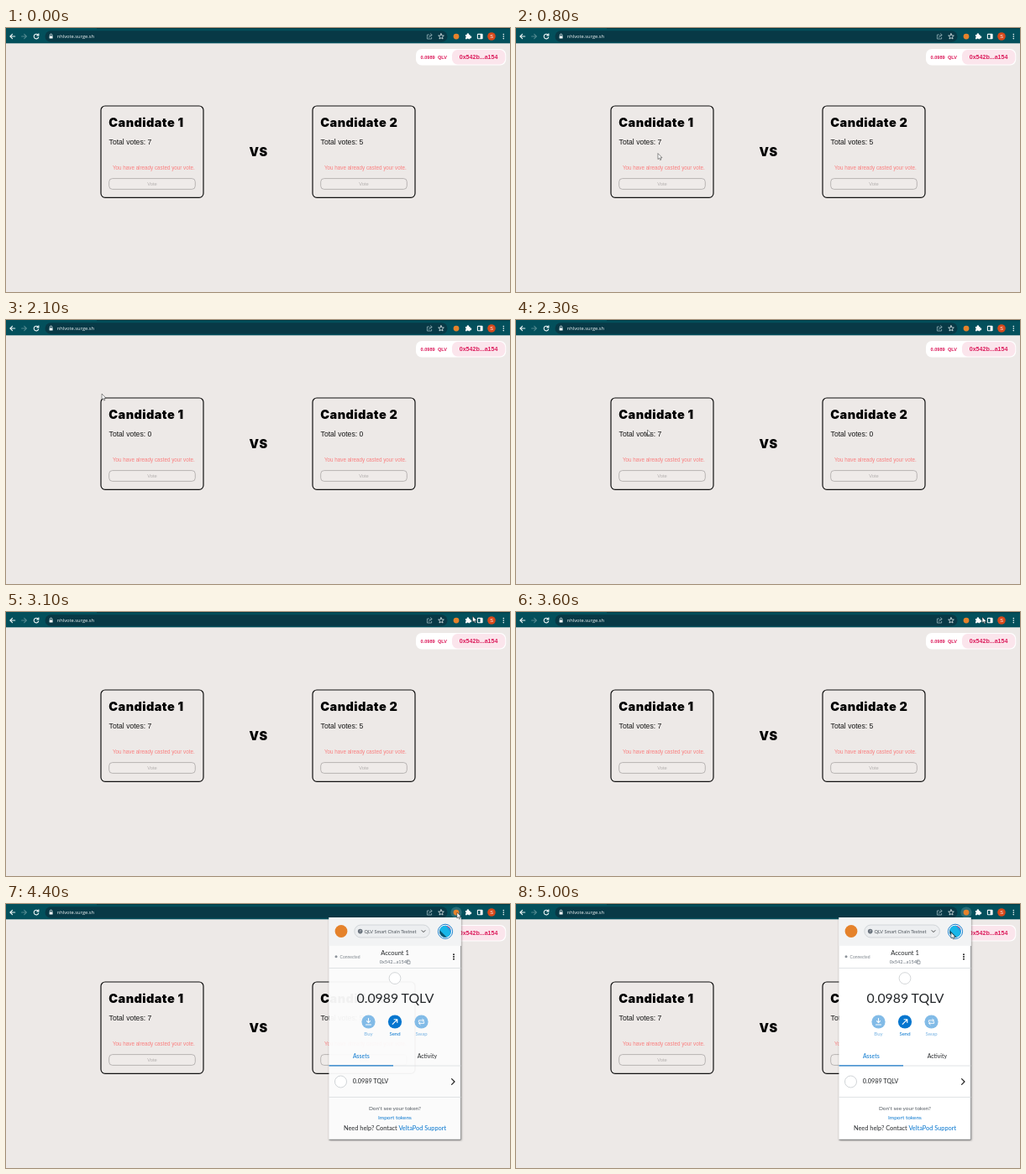
Write an HTML page that moves like this. It is 600 by 315 pixels and loops after 5.1 s.

```html
<!DOCTYPE html>
<html lang="en">
<head>
<meta charset="utf-8">
<title>Vote</title>
<style>
html, body { margin: 0; width: 100%; height: 100%; overflow: hidden; background: #ede9e7; }
svg { display: block; width: 600px; height: 315px; }
text { font-family: "Liberation Sans", Arial, sans-serif; }
.black { font: 900 14.5px Inter, sans-serif; letter-spacing: .42px; }
.lato, .lato text { font-family: Lato, sans-serif; }
.mid { text-anchor: middle; }
.line { fill: none; stroke-linecap: round; stroke-linejoin: round; }
</style>
</head>
<body>
<svg viewBox="0 0 600 315">
  <defs>
    <g id="card">
      <rect x="113" y="93" width="122" height="109.3" rx="5" fill="none" stroke="#111" stroke-width="1.2"/>
      <text x="127" y="168.6" font-size="6.28" fill="#fa7f7f">You have already casted your vote.</text>
      <rect x="122.7" y="179.6" width="102.6" height="12.8" rx="4" fill="#efebe9" stroke="#aaa6a5" stroke-width=".8"/>
      <text class="mid" x="174" y="188" font-size="5.8" fill="#b4b0af">Vote</text>
    </g>
    <filter id="shade" x="-10%" y="-10%" width="120%" height="120%">
      <feDropShadow dx=".6" dy="1" stdDeviation="1.2" flood-opacity=".5"/>
    </filter>
    <clipPath id="face"><circle cx="523" cy="32.8" r="7"/></clipPath>
  </defs>

  <rect width="600" height="315" fill="#ede9e7"/>

  <!-- voting page -->
  <use href="#card"/>
  <use href="#card" x="252"/>
  <text class="black" x="122.3" y="118">Candidate 1</text>
  <text class="black" x="374.3" y="118">Candidate 2</text>
  <text id="votes1" x="122.6" y="139" font-size="8.6" fill="#151515"></text>
  <text id="votes2" x="374.6" y="139" font-size="8.6" fill="#151515"></text>
  <text class="black" x="289.5" y="153.2">VS</text>

  <rect x="488" y="25" width="107.3" height="19.5" rx="7" fill="#fff"/>
  <rect x="531" y="26" width="63.3" height="17.5" rx="6.5" fill="#fbe5ec"/>
  <g font-weight="700" fill="#dc1c5c">
    <text x="493.6" y="37" font-size="5.6">0.0989</text>
    <text x="514" y="37" font-size="5.6">QLV</text>
    <text x="539.7" y="37.2" font-size="7.1">0x542b...a154</text>
  </g>

  <!-- browser bar -->
  <rect width="600" height="18.3" fill="#03505c"/>
  <rect x="108" width="492" height="1.2" fill="#023c46"/>
  <rect x="46.5" y="3.2" width="479" height="13.6" rx="6.8" fill="#083946"/>
  <circle id="hover" r="6.6" fill="#fff" opacity=".16"/>
  <g class="line" stroke="#eef5f6" stroke-width="1.1">
    <path d="M10.7 10H5M7.6 7.3L4.9 10L7.6 12.7"/>
    <path d="M18.6 10H24.3M21.7 7.3L24.4 10L21.7 12.7" stroke="#50868e"/>
    <path d="M38.3 8.4A2.8 2.8 0 1 0 38.7 11M38.9 6.8V8.9H36.8"/>
    <path d="M52.3 9.4V8.4A1.3 1.3 0 0 1 54.9 8.4V9.4" stroke-width=".8"/>
    <path d="M503.4 8H501.4V13H506.6V11.4M503.4 11.2Q503.6 8.6 506.8 8.4M505.4 6.8L507.2 8.4L505.4 10" stroke="#9fbac0" stroke-width=".75"/>
    <path id="star" stroke-width=".75"/>
    <rect x="561.4" y="7.4" width="5.6" height="5.4" rx=".5"/>
  </g>
  <rect x="51.6" y="9.4" width="4" height="3.2" rx=".5" fill="#eef5f6"/>
  <text x="60.7" y="12.3" font-size="5.75" fill="#f1f6f7" style="font-family:'Open Sans',sans-serif">nhlvote.surge.sh</text>
  <circle cx="536" cy="10.1" r="3.4" fill="#e5822b"/>
  <path d="M547 8.1H548.7A1.3 1.3 0 1 1 551.1 8.1H552.4V9.6A1.3 1.3 0 1 1 552.4 12V13.3H550.8A1.2 1.2 0 0 0 548.6 13.3H547V11.6A1.2 1.2 0 0 0 547 9.4Z" fill="#fff"/>
  <rect x="564.6" y="7.2" width="2.6" height="5.8" fill="#fff"/>
  <circle cx="578" cy="10" r="4.8" fill="#d8491b"/>
  <text class="mid" x="578" y="12" font-size="5.6" fill="#fff">S</text>
  <g fill="#eef5f6">
    <circle cx="592.3" cy="7.6" r=".8"/><circle cx="592.3" cy="10.1" r=".8"/><circle cx="592.3" cy="12.6" r=".8"/>
  </g>

  <!-- wallet popup -->
  <g id="popup" class="lato">
    <rect id="sheet" x="384.5" y="16" width="157" height="265" fill="#fff" filter="url(#shade)"/>
    <path d="M541.4 50V281M384.5 281.2H541.5" stroke="#77797b" stroke-width=".7"/>
    <rect x="384.5" y="16" width="157" height="33.8" fill="#f2f3f4"/>
    <circle cx="399" cy="32.5" r="7.4" fill="#e5822b"/>
    <rect x="414.8" y="25" width="89.6" height="15" rx="7.5" fill="#eceef0" stroke="#c4c9cd" stroke-width=".7"/>
    <circle cx="421.7" cy="32.6" r="2.8" fill="#6a737d"/>
    <text class="mid" x="421.7" y="34.3" font-size="4.6" fill="#fff">?</text>
    <text x="426.4" y="34.6" font-size="5.7" fill="#4f565d">QLV Smart Chain Testnet</text>
    <path class="line" d="M495 31.6L497 33.6L499 31.6" stroke="#333" stroke-width=".9"/>
    <circle cx="523" cy="32.8" r="8.6" fill="#fff" stroke="#1b7fcb" stroke-width="1"/>
    <g clip-path="url(#face)">
      <rect x="515" y="25" width="16" height="16" fill="#2796df"/>
      <path d="M515 25H523L531 37V41H515Z" fill="#18b6e8"/>
      <path d="M515 30L526 41H515Z" fill="#0c5570"/>
      <path d="M523 25H531V31Z" fill="#f0435f"/>
    </g>

    <circle cx="393" cy="62.8" r="1.5" fill="#8b9299"/>
    <text x="397.6" y="64.6" font-size="5" fill="#7c848b">Connected</text>
    <text class="mid" x="463" y="61" font-size="7.5" fill="#24272a">Account 1</text>
    <text x="444.8" y="71" font-size="5.6" fill="#6a737d">0x542...a154</text>
    <path class="line" d="M477.2 70.4V67H480M478.2 68H481V71.5H478.2Z" stroke="#6a737d" stroke-width=".6"/>
    <g fill="#222">
      <circle cx="533" cy="60.2" r="1"/><circle cx="533" cy="63" r="1"/><circle cx="533" cy="65.8" r="1"/>
    </g>
    <g stroke="#d9dcdf" stroke-width=".8">
      <path d="M384.5 76.5H541.5M384.5 193H541.5M384.5 230.5H541.5"/>
      <circle cx="463" cy="88.6" r="6.9" fill="#fff" stroke="#c9cdd0"/>
      <circle cx="398.5" cy="212" r="7" fill="#fff" stroke="#c4c9cd"/>
    </g>
    <text class="mid" x="463.5" y="118" font-size="15.8" fill="#24272a">0.0989 TQLV</text>

    <circle cx="431.5" cy="140.5" r="8.1" fill="#82bbe7"/>
    <circle cx="463" cy="140.5" r="8.1" fill="#0676cf"/>
    <circle cx="494.5" cy="140.5" r="8.1" fill="#82bbe7"/>
    <g class="line" stroke="#fff" stroke-width="1.1">
      <path d="M431.5 136.6V141.3M429.5 139.6L431.5 141.6L433.5 139.6M428.5 144H434.5"/>
      <path d="M460.2 143.3L465.6 137.9M462 137.7H465.8V141.5"/>
      <path d="M491.4 141V138.8H497.2M495.8 137.3L497.4 138.8L495.8 140.3M497.6 140.4V142.4H491.8M493.2 140.9L491.6 142.4L493.2 143.9" stroke-width=".9"/>
    </g>
    <g class="mid" font-size="6">
      <text x="431.5" y="157" fill="#76b2e2">Buy</text>
      <text x="463" y="157" fill="#0676cf">Send</text>
      <text x="494.5" y="157" fill="#76b2e2">Swap</text>
    </g>
    <g class="mid" font-size="6.9">
      <text x="422.8" y="183.7" fill="#0676cf">Assets</text>
      <text x="501.3" y="183.7" fill="#24272a">Activity</text>
    </g>
    <path d="M384.5 192.8H461" stroke="#1878c8" stroke-width="1.2"/>
    <text x="412.8" y="214.3" font-size="7.3" fill="#24272a">0.0989 TQLV</text>
    <path class="line" d="M530.6 208.6L534 212L530.6 215.4" stroke="#222" stroke-width="1.2"/>
    <text class="mid" x="463" y="246.3" font-size="6.5" fill="#535a61">Don't see your token?</text>
    <text class="mid" x="463" y="257" font-size="6.5" fill="#0676cf">Import tokens</text>
    <text class="mid" x="463" y="270.3" font-size="7.4" fill="#24272a">Need help? Contact <tspan fill="#0676cf">VeltaPod Support</tspan></text>
  </g>

  <path id="cursor" d="M0 0V7L1.6 5.6L2.7 8L3.8 7.5L2.8 5.2H5Z" fill="#fff" stroke="#222" stroke-width=".5"/>
</svg>
<script>
const LOOP = 5100, STEP = 100;
const $ = id => document.getElementById(id);
const put = (id, name, value) => $(id).setAttribute(name, value);
const show = (id, on) => put(id, "visibility", on ? "visible" : "hidden");

// time, x, y of the pointer
const path = [
  [200, 225, 203], [700, 180, 160], [1200, 74, 60], [1500, 36, 9], [1800, 36, 9],
  [2300, 156.5, 131], [2600, 200, 120], [3100, 555.5, 5], [3700, 555, 6],
  [3900, 538, 8.5], [4200, 537.3, 9], [4600, 536.5, 11], [5000, 518, 34]
];

function pointer(t) {
  const i = path.findIndex(p => p[0] >= t);
  if (i < 0) return path[path.length - 1].slice(1);
  if (i === 0) return path[0].slice(1);
  const [a, b] = [path[i - 1], path[i]];
  const k = (t - a[0]) / (b[0] - a[0]);
  const e = k * k * (3 - 2 * k);
  return [a[1] + (b[1] - a[1]) * e, a[2] + (b[2] - a[2]) * e];
}

function star(cx, cy, r) {
  const points = Array.from({ length: 10 }, (_, i) => {
    const a = i * Math.PI / 5, d = i % 2 ? r * .45 : r;
    return (cx + d * Math.sin(a)).toFixed(2) + " " + (cy - d * Math.cos(a)).toFixed(2);
  });
  return "M" + points.join("L") + "Z";
}

function draw(time) {
  const t = Math.floor(time % LOOP / STEP) * STEP;
  const [x, y] = pointer(t);
  put("cursor", "transform", `translate(${x.toFixed(2)} ${y.toFixed(2)})`);
  show("cursor", t >= 200);

  // counters read zero until the reloaded page has its data
  $("votes1").textContent = "Total votes: " + (t >= 1900 && t < 2200 ? 0 : 7);
  $("votes2").textContent = "Total votes: " + (t >= 1900 && t < 2500 ? 0 : 5);

  const target = [36, 536, 550].find(cx => Math.hypot(x - cx, y - 10) < 5);
  const lit = t >= 4300 ? 536 : target;
  show("hover", t >= 200 && lit);
  put("hover", "cx", lit || 0);
  put("hover", "cy", 10);

  show("popup", t >= 4300);
  put("sheet", "fill-opacity", t < 4400 ? .8 : t < 4700 ? .93 : 1);
}

put("star", "d", star(518, 10.2, 3.5));
const start = performance.now();
function tick() {
  draw(performance.now() - start);
  requestAnimationFrame(tick);
}
tick();
</script>
</body>
</html>
```
